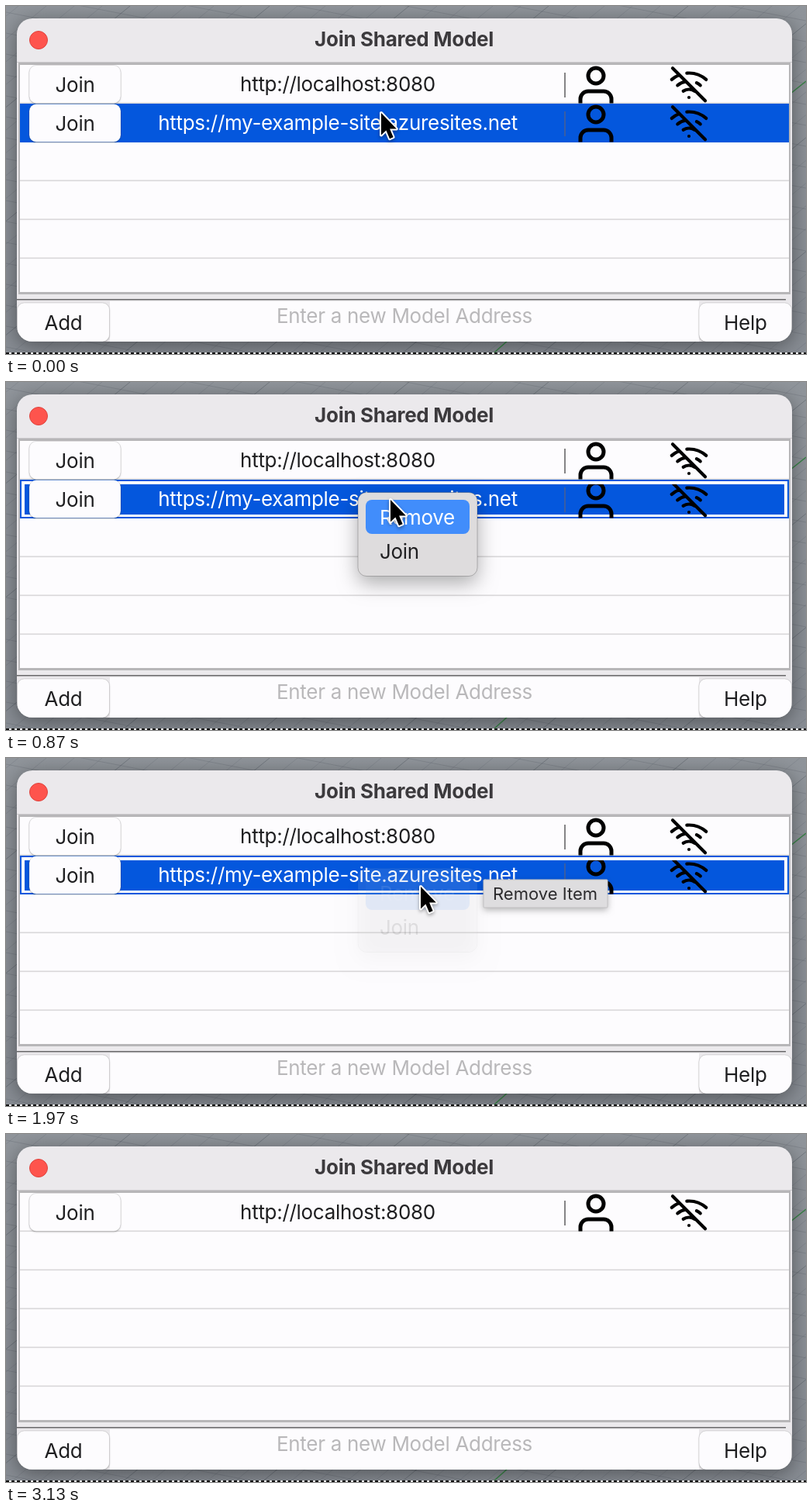
An HTML page with a canvas that plays this animation: 1032x449 px, repeating every 3330 ms.

```html
<!DOCTYPE html>
<html lang="en">
<head>
<meta charset="utf-8">
<title>Join Shared Model</title>
<style>
html, body { margin: 0; width: 100%; height: 100%; overflow: hidden; background: #858a91; }
canvas { display: block; width: 1032px; height: 449px; }
</style>
</head>
<body>
<canvas id="stage" width="1032" height="449"></canvas>
<script>
const c = document.getElementById('stage').getContext('2d');
const LOOP = 3330;
const FONT = 'Inter, "Liberation Sans", sans-serif';
const WHITE = '#fdfcfe', INK = '#1f1f21', BLUE = '#0457dd';

const USER = new Path2D('M20 21v-2a4 4 0 0 0-4-4H8a4 4 0 0 0-4 4v2M16 7a4 4 0 1 1-8 0a4 4 0 1 1 8 0');
const OFFLINE = new Path2D('M2 2L22 22M16.72 11.06A10.94 10.94 0 0 1 19 12.55M5 12.55a10.94 10.94 0 0 1 5.17-2.39' +
  'M10.71 5.05A16 16 0 0 1 22.58 9M1.42 9a15.91 15.91 0 0 1 4.7-2.88M8.53 16.11a6 6 0 0 1 6.95 0M12 20h.01');
const ARROW = new Path2D('M0 0V28.5L6.4 22.4L11 33.2L15.6 31.2L11.1 20.6H19.8Z');

// Pointer path: time, x, y
const PATH = [[0, 484, 138], [250, 455, 152], [560, 455, 152], [870, 496, 152], [1350, 535, 166], [LOOP, 535, 166]];
const MENU_OPEN = 490, MENU_FADE = 1800, MENU_GONE = 1990;
const REMOVE_AT = 2060, REMOVE_MS = 210;

const clamp = v => Math.max(0, Math.min(1, v));
const ease = v => { v = clamp(v); return v * v * (3 - 2 * v); };
const within = (t, a, b) => t >= a && t < b;

function rect(x, y, w, h, fill) {
  c.fillStyle = fill;
  c.fillRect(x, y, w, h);
}

function round(x, y, w, h, r, fill, stroke) {
  c.beginPath();
  c.roundRect(x, y, w, h, r);
  c.fillStyle = fill;
  c.fill();
  if (stroke) {
    c.shadowColor = 'transparent';
    c.strokeStyle = stroke;
    c.lineWidth = 1;
    c.stroke();
  }
}

function line(x1, y1, x2, y2, color, width = 1) {
  c.beginPath();
  c.moveTo(x1, y1);
  c.lineTo(x2, y2);
  c.strokeStyle = color;
  c.lineWidth = width;
  c.stroke();
}

function shadow(color, blur, dy) {
  c.shadowColor = color;
  c.shadowBlur = blur;
  c.shadowOffsetY = dy;
}

function text(str, x, y, color = INK, { size = 26, weight = 400, align = 'center', gap = -0.3 } = {}) {
  c.font = `${weight} ${size}px ${FONT}`;
  c.letterSpacing = gap + 'px';
  c.textAlign = align;
  c.fillStyle = color;
  c.fillText(str, x, y);
}

function group(draw) {
  c.save();
  draw();
  c.restore();
}

function clip(x, y, w, h) {
  c.beginPath();
  c.rect(x, y, w, h);
  c.clip();
}

function icon(path, x, y, scale) {
  group(() => {
    c.translate(x, y);
    c.scale(scale, scale);
    c.lineWidth = 2;
    c.lineCap = c.lineJoin = 'round';
    c.strokeStyle = '#000';
    c.stroke(path);
  });
}

function button(label, x, y, w, h) {
  group(() => {
    shadow('rgba(0,0,0,.25)', 2, 1);
    round(x, y, w, h, 9, WHITE, 'rgba(0,0,0,.1)');
  });
  text(label, x + w / 2, y + h / 2 + 9.5);
}

function backdrop() {
  const g = c.createLinearGradient(0, 0, 0, 449);
  g.addColorStop(0, '#90959b');
  g.addColorStop(1, '#878c93');
  rect(0, 0, 1032, 449, g);
  for (let i = 0; i < 48; i++) {
    const x = i * 36 - 20;
    line(x, 0, x - 550, 449, i % 5 ? 'rgba(70,78,88,.16)' : 'rgba(60,68,78,.34)');
  }
  for (let i = -8; i < 18; i++) {
    const y = i * 27 + 8;
    line(0, y, 1032, y + 200, 'rgba(70,78,88,.2)');
  }
  line(1012, 113, 1032, 97, '#398447', 1.5);
  line(630, 447, 648, 431, '#398447', 1.5);
  rect(0, 447, 1032, 2, '#fff');
  for (let x = 0; x < 1032; x += 7) rect(x, 447, 4, 2, '#111');
}

function row(url, y, selected, focused) {
  if (selected) rect(18, y, 992, 50, BLUE);
  if (focused) {
    rect(20, y + 2, 988, 46, WHITE);
    rect(24, y + 6, 980, 39, BLUE);
  }
  button('Join', 30, y + 0.5, 118, 49);
  text(url, 428, y + 34, selected ? '#fff' : INK);
  line(721, y + 10, 721, y + 42, selected ? '#4a5f91' : '#5c5c5e', 1.5);
  group(() => {
    clip(18, y + (focused ? 6 : 0), 992, 49.5 - (focused ? 6 : 0));
    icon(USER, 731, y - 3.5, 2.5);
    icon(OFFLINE, 855.8, y, 2.1);
  });
}

function list(t) {
  rect(16, 73, 996, 299, '#b7b6b8');
  rect(18, 76, 992, 293, WHITE);
  for (let y = 125; y < 369; y += 50) rect(18, y - 0.5, 992, 1.6, '#d9d8da');
  row('http://localhost:8080', 76, false, false);
  const slide = 50 * ease((t - REMOVE_AT) / REMOVE_MS);
  if (slide < 50) group(() => {
    clip(18, 126, 992, 51);
    row('https://my-example-site.azuresites.net', 126 - slide, true, within(t, MENU_OPEN, REMOVE_AT));
    if (slide) rect(18, 176 - slide, 992, slide - 1, WHITE);
  });
}

function dialog(t) {
  group(() => {
    shadow('rgba(0,0,0,.4)', 26, 5);
    round(14, 16, 1000, 417, 20, '#ebe9ec');
  });
  group(() => {
    c.beginPath();
    c.roundRect(14, 16, 1000, 417, 20);
    c.clip();
    rect(14, 72, 1000, 1, '#cbc9cc');
    list(t);
    rect(14, 378, 992, 1.5, '#69686a');
    rect(134, 381, 760, 52, WHITE);
    button('Add', 14.5, 383, 119, 50);
    button('Help', 894, 383, 119.5, 50);
    text('Enter a new Model Address', 514, 409, '#b9b8ba');
  });
  c.beginPath();
  c.arc(42, 44, 11.5, 0, 7);
  c.fillStyle = '#fe544d';
  c.fill();
  c.strokeStyle = '#df443e';
  c.lineWidth = 1;
  c.stroke();
  text('Join Shared Model', 513.5, 52, '#3c3a3d', { weight: 700 });
}

function menu(t, px) {
  if (!within(t, MENU_OPEN, MENU_GONE)) return;
  c.globalAlpha = 1 - clamp((t - MENU_FADE) / (MENU_GONE - MENU_FADE));
  group(() => {
    shadow('rgba(0,0,0,.32)', 26, 9);
    round(454, 142.5, 154, 108, 11, '#dedcdd', 'rgba(0,0,0,.22)');
  });
  const active = px > 458 && !within(t, 1740, 1790);
  if (active) round(464, 152, 134, 44, 8, '#418dfb');
  text('Remove', 482, 184, active ? '#fff' : INK, { align: 'left' });
  text('Join', 482, 228, INK, { align: 'left' });
  c.globalAlpha = 1;
}

function tooltip(t) {
  if (!within(t, 1890, REMOVE_AT)) return;
  group(() => {
    shadow('rgba(0,0,0,.3)', 8, 3);
    round(616, 157, 160, 36, 1, '#dedddf', '#c2c1c3');
  });
  text('Remove Item', 695.5, 183, '#2b2a2c', { size: 22, gap: 0 });
}

function ring(x, y, color) {
  for (const [style, width] of [['#fff', 5.5], [color, 3]]) {
    c.beginPath();
    c.arc(x, y, 43, 0, 7);
    c.strokeStyle = style;
    c.lineWidth = width;
    c.stroke();
  }
}

function pointerAt(t) {
  const i = PATH.findIndex(p => p[0] > t);
  const [t0, x0, y0] = PATH[i - 1], [t1, x1, y1] = PATH[i];
  const k = ease((t - t0) / (t1 - t0));
  return [x0 + (x1 - x0) * k, y0 + (y1 - y0) * k];
}

function pointer(x, y) {
  group(() => {
    c.translate(x, y);
    c.lineJoin = 'round';
    c.lineWidth = 4;
    c.strokeStyle = '#fff';
    shadow('rgba(0,0,0,.35)', 4, 2);
    c.stroke(ARROW);
    c.shadowColor = 'transparent';
    c.fillStyle = '#000';
    c.fill(ARROW);
  });
}

function draw(t) {
  const [x, y] = pointerAt(t);
  backdrop();
  dialog(t);
  menu(t, x);
  tooltip(t);
  if (within(t, 270, 470)) ring(454, 154, '#12b516');
  if (within(t, 1560, 1740)) ring(534, 167, '#111');
  if (t < 3130) pointer(x, y);
}

const start = performance.now();
function tick() {
  draw((performance.now() - start) % LOOP);
  requestAnimationFrame(tick);
}
tick();
</script>
</body>
</html>
```
